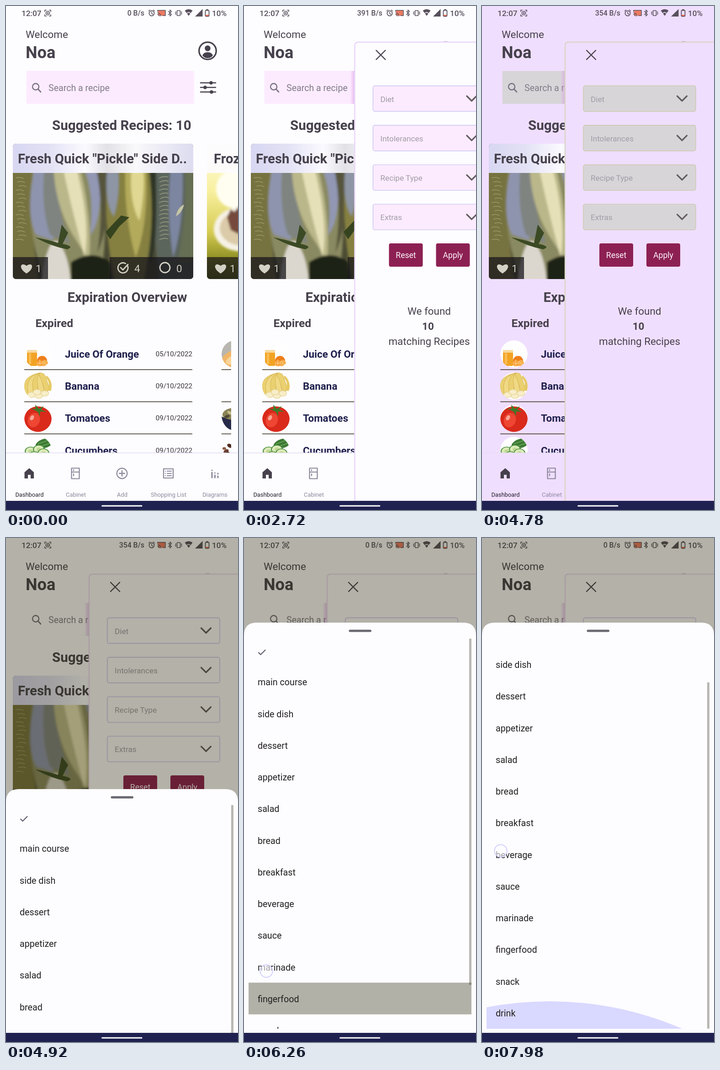
Recreate the animation shown at these times as an HTML page. Size 508 px wide and 1102 px high, loop 8000 ms.

```html
<!DOCTYPE html>
<html lang="en">
<head>
<meta charset="utf-8">
<title>Recipe app</title>
<style>
html, body { margin: 0; width: 100%; height: 100%; overflow: hidden; background: #fdfcff; }
svg { display: block; width: 100vw; height: 100vh; font-family: Roboto, sans-serif; --paper: #fdfcff; --fill: #fcebff; --edge: #c9c5f2; --rim: #ead6fb; }
.b { font-weight: 700; }
.m { font-weight: 500; }
.mid { text-anchor: middle; }
.end { text-anchor: end; }
.line { fill: none; stroke-linecap: round; stroke-linejoin: round; }
.field { fill: var(--fill); stroke: var(--edge); stroke-width: 1.4; }
.panel { fill: var(--paper); stroke: var(--rim); stroke-width: 2.4; }
</style>
</head>
<body>
<svg id="stage" viewBox="0 0 508 1102" preserveAspectRatio="none"></svg>
<script>
const LOOP = 8000;
const INK = '#46414c', NAVY = '#1f204c', GREY = '#8b889a';

const text = (x, y, size, str, fill = INK, cls = '') =>
  `<text x="${x}" y="${y}" font-size="${size}" fill="${fill}" class="${cls}">${str}</text>`;
const rect = (x, y, w, h, fill, r = 0, more = '') =>
  `<rect x="${x}" y="${y}" width="${w}" height="${h}" rx="${r}" fill="${fill}" ${more}/>`;
const disc = (x, y, r, fill, more = '') => `<circle cx="${x}" cy="${y}" r="${r}" fill="${fill}" ${more}/>`;
const oval = (x, y, rx, ry, fill, turn = 0) =>
  `<ellipse cx="${x}" cy="${y}" rx="${rx}" ry="${ry}" fill="${fill}" transform="rotate(${turn} ${x} ${y})"/>`;
const shape = (d, fill) => `<path d="${d}" fill="${fill}"/>`;
const line = (d, stroke = INK, w = 2) => `<path class="line" d="${d}" stroke="${stroke}" stroke-width="${w}"/>`;
const ring = (x, y, r, stroke, w) => disc(x, y, r, 'none', `stroke="${stroke}" stroke-width="${w}"`);
const clip = (id, box) => `<clipPath id="${id}">${box}</clipPath>`;

const defs = `<defs>
  ${clip('card', rect(15, 301, 395, 296, '#000', 7))}
  ${clip('card2', rect(440, 301, 395, 296, '#000', 7))}
  ${clip('pantry', rect(0, 720, 493, 257, '#000'))}
  ${clip('rows', rect(0, 220, 508, 853, '#000'))}
  ${clip('glowBox', rect(10, 900, 488, 173, '#000'))}
  ${clip('food', disc(0, 0, 30, '#000'))}
  <filter id="soft"><feGaussianBlur stdDeviation="2.5"/></filter>
  <linearGradient id="band"><stop offset="0" stop-color="#d8d7f2"/><stop offset=".2" stop-color="#e2e1f4"/>
    <stop offset=".4" stop-color="#fbfaff"/><stop offset=".52" stop-color="#e2e1e6"/>
    <stop offset=".68" stop-color="#f9f8fa"/><stop offset="1" stop-color="#dddcf0"/></linearGradient>
  <linearGradient id="sun" x2="0" y2="1"><stop offset="0" stop-color="#fffde0"/><stop offset=".35" stop-color="#f8f0a0"/>
    <stop offset=".65" stop-color="#d6cc52"/><stop offset=".85" stop-color="#8f9024"/><stop offset="1" stop-color="#5f6416"/></linearGradient>
  <linearGradient id="shade"><stop offset="0" stop-color="#d79ae2" stop-opacity="0"/>
    <stop offset="1" stop-color="#d79ae2" stop-opacity=".6"/></linearGradient>
</defs>`;

function statusBar() {
  const c = '#57505c';
  return text(34, 21.5, 17.2, '12:07', c, 'm')
    + line('M85 12v-3h3M95 9h3v3M98 19v3h-3M88 22h-3v-3', c, 1.7) + ring(91.5, 15.5, 4, c, 1.7) + disc(91.5, 15.5, 1.7, c)
    + `<text id="speed" x="303" y="21" font-size="15.8" fill="${c}" class="m end"></text>`
    + ring(319, 16, 5.6, c, 1.7) + line('M319 13v3.5l2.5 1.5M312.5 11l3-2.5M325.5 11l-3-2.5', c, 1.5)
    + rect(333, 10, 15, 11, '#ee7a62') + line('M332 12V9.5h17V21h-6M332 15a7 7 0 0 1 7 7M332 18.5a3.5 3.5 0 0 1 3.5 3.5', c, 1.6)
    + line('M355.5 11.5l7 7-3.5 3.5V8.5l3.5 3.5-7 7', c, 1.5)
    + rect(374.5, 10, 7, 11, 'none', 1, `stroke="${c}" stroke-width="1.7"`) + line('M371.5 12.5v6M384.5 12.5v6', c, 1.5)
    + shape('M391.5 10Q400 4 408.5 10L400 21.5Z', c) + line('M396 16q4-4 8 0', 'var(--paper)', 1.2)
    + shape('M414 23L430.5 6.5V23Z', c)
    + rect(436.5, 9.5, 8, 13, 'none', 1.5, `stroke="${c}" stroke-width="1.8"`) + rect(438.5, 7, 4, 2.5, c) + rect(437, 19.5, 7, 2.5, '#e2634c')
    + text(451, 21.5, 17.2, '10%', c, 'm');
}

function header() {
  return text(43, 70, 22.4, 'Welcome') + text(43, 114, 36.2, 'Noa', INK, 'b')
    + ring(441.5, 98, 18.8, INK, 3.3) + disc(441.5, 92.5, 6.3, INK)
    + shape('M430 108q3-7 11.5-7t11.5 7q-4 6-11.5 6t-11.5-6Z', INK)
    + rect(44.5, 142, 367, 72, 'var(--fill)', 2)
    + ring(65, 176.5, 7, '#77727f', 2.4) + line('M70.5 182l5.5 6', '#77727f', 2.6)
    + text(93, 186, 19.6, 'Search a recipe', '#817b88')
    + line('M426 168h33M426 178h33M426 188h33', INK, 2.6)
    + disc(449, 168, 3.8, INK) + disc(436, 178, 3.8, INK) + disc(450, 188, 3.8, INK)
    + text(101, 271, 29.5, 'Suggested Recipes: 10', INK, 'b');
}

const heart = x => shape(`M${x} 585C${x - 20} 572 ${x - 12} 559 ${x} 568C${x + 12} 559 ${x + 20} 572 ${x} 585Z`, '#d3d0c5');

function cucumbers() {
  let ribs = '';
  for (let i = 0; i < 16; i++) {
    const y = 376 + i * 9;
    ribs += line(`M${22 + i % 3 * 3} ${y}q8 -3 16 1`, '#b3b083', 1.6) + line(`M${336 + i % 3} ${y}q9 -5 18 -2`, '#a6ab8c', 2);
  }
  return rect(15, 301, 395, 296, '#4c4c34')
    + `<g filter="url(#soft)">`
    + shape('M5 340H62Q44 440 74 610H5Z', '#77733f')
    + shape('M62 340Q36 480 88 610H205Q226 500 212 340Z', '#8a8a62')
    + shape('M66 340Q40 450 66 500L104 512Q96 430 106 340Z', '#8f94ae')
    + shape('M84 350Q76 440 96 500L140 520Q108 430 112 340Z', '#7f8480')
    + shape('M104 340Q104 430 146 500L182 556Q190 460 158 340Z', '#bab78a')
    + shape('M122 340Q140 430 172 548Q186 470 150 340Z', '#e6e0b8')
    + shape('M164 340Q196 400 184 500Q212 470 206 350Z', '#9298b4')
    + shape('M196 350Q216 430 200 540Q232 470 222 350Z', '#57543a')
    + shape('M76 610Q90 508 112 514Q138 540 142 610Z', '#dcd7ce')
    + shape('M226 340Q208 470 240 610H300Q330 470 314 340Z', '#85803f')
    + shape('M262 340Q256 450 284 550Q314 470 306 340Z', '#b4aa5c')
    + shape('M274 360Q270 430 292 470Q308 390 298 345Z', '#e0d892')
    + shape('M222 350Q214 430 236 460Q252 410 244 345Z', '#8e95a4')
    + shape('M324 340Q320 480 336 610H415V340Z', '#5c655c')
    + shape('M362 340Q350 450 366 550Q392 470 386 340Z', '#7d86a0')
    + shape('M390 340Q400 440 376 560H415V340Z', '#666e52')
    + shape('M312 350Q326 450 312 560Q334 560 328 350Z', '#2f3527')
    + shape('M142 560Q190 530 228 560L232 610H142Z', '#1e2014')
    + `</g><g opacity=".6">${ribs}</g>`
    + shape('M64 506Q96 512 114 518L122 478L136 496L124 520Q152 526 134 532Q100 526 64 506Z', '#3b4a24')
    + shape('M218 494L252 458L270 462L248 482L228 510Z', '#36431f')
    + shape('M372 460Q376 440 390 434Q386 452 372 460Z', '#c7c6a4');
}

function cards() {
  return `<g clip-path="url(#card)">${cucumbers()}${rect(15, 301, 395, 64, 'url(#band)')}`
    + rect(15, 549, 77, 48, '#16151a', 0, 'opacity=".74"') + rect(227, 549, 183, 48, '#16151a', 0, 'opacity=".74"') + `</g>`
    + text(26, 344, 29.3, 'Fresh Quick "Pickle" Side D..', INK, 'b')
    + heart(45) + text(65, 582, 22.4, '1', '#d3d0c5')
    + line('M266.5 569a11 11 0 1 1-5-6M251 572l5 5 11-12', '#d3d0c5', 2.8) + text(281, 582, 22.4, '4', '#d3d0c5')
    + ring(348, 572, 11, '#d3d0c5', 2.8) + text(373, 582, 22.4, '0', '#d3d0c5')
    + `<g clip-path="url(#card2)">${rect(440, 301, 68, 296, 'url(#sun)')}<g filter="url(#soft)">`
    + oval(500, 400, 40, 42, '#fffef0') + oval(512, 488, 57, 48, '#f6f2e6') + oval(516, 486, 48, 38, '#dccba8')
    + shape('M484 462L492 444L500 450L512 436V500L492 490Z', '#74493a') + `</g>`
    + rect(440, 301, 68, 64, '#fdfcff', 0, 'opacity=".92"') + rect(440, 549, 68, 48, '#16151a', 0, 'opacity=".7"') + `</g>`
    + text(455, 344, 29.3, 'Froz', INK, 'b') + heart(470) + text(490, 582, 22.4, '1', '#d3d0c5');
}

const juice = rect(-24, -9, 22, 35, '#f2a324', 2) + rect(-24, -9, 22, 6, '#f8d9a0') + rect(-20, -2, 5, 24, '#f9bd55')
  + disc(9, 15, 11, '#ef7f1c') + disc(4, 20, 7, '#f9a23a') + disc(15, 20, 7, '#f6b04f') + line('M4 13v14M-2 20h12M10 16l10 8', '#fbd9a0', 1);
// a fan of bananas from one stem, with slices in front
const banana = [-26, -16, -5, 7, 19].map((x, i) => {
  const d = `M8 -24Q${x - 6} -18 ${x} ${14 - i * 2}`;
  return line(d, '#cfae4c', 12) + line(d, i % 2 ? '#f0d985' : '#ead070', 10.5);
}).join('') + line('M22 -20Q32 -8 26 6', '#e6c964', 9)
  + [[-14, 19], [2, 21], [15, 16], [-2, 13]].map(([x, y]) => oval(x, y, 9, 6.5, '#e3cf8c') + oval(x, y, 8, 5.5, '#f7edc8')).join('');
const tomato = oval(0, 2, 30, 28, '#d92a1c') + oval(-9, 4, 13, 16, '#ee4632', 20) + oval(-13, -1, 4, 6, '#f9a596', 30)
  + shape('M0 -14L-17 -22L-5 -20L-6 -30L2 -21L13 -27L7 -19L19 -14L5 -15L4 -4Z', '#3f7a2a');
const cuke = oval(14, -15, 20, 10, '#3c7a35', -18) + line('M0 -14L28 -24M4 -8L30 -17', '#78b062', 1.5)
  + [[-16, 2], [2, -2], [-8, 12], [12, 6]].map(([x, y]) => oval(x, y, 13, 10, '#4a8c3f') + oval(x, y, 11, 8.5, '#dcebb9') + oval(x, y, 5, 4, '#c0d894')).join('');
const melon = disc(0, 0, 30, '#b9b6b0') + oval(0, 8, 34, 18, '#f0b568', -25) + oval(-4, 12, 18, 9, '#f8d59b', -25);
const seeds = oval(0, -8, 28, 15, '#8b8357') + oval(-12, -12, 6, 3, '#c7bf8e', 30) + oval(-18, -4, 6, 3, '#4e4a32', -20) + shape('M-30 -4Q0 12 30 -4Q24 26 0 28Q-26 24 -30 -4Z', '#272a48');
const cloves = oval(-12, -10, 6, 4, '#4f2d24', 30) + oval(-20, 2, 6, 4, '#6d4030', -30) + oval(-14, 9, 7, 4, '#3d241e', 60) + oval(-24, -4, 4, 3, '#8a5a44');

const food = (x, y, art) => `<g transform="translate(${x} ${y})" clip-path="url(#food)">${disc(0, 0, 30, '#fefeff')}${art}</g>`;

function pantry() {
  const items = [['Juice Of Orange', '05', juice, melon], ['Banana', '09', banana, ''],
    ['Tomatoes', '09', tomato, seeds], ['Cucumbers', '09', cuke, cloves]];
  const rows = items.map(([name, day, art, next], i) => {
    const y = 761 + i * 70.2;
    return food(70, y, art) + (next && food(502, y, next))
      + text(129, y + 8, 22.4, name, NAVY, 'b') + text(408, y + 5, 15.1, day + '/10/2022', '#38343a', 'end')
      + rect(40, y + 33.3, 368, 1.7, '#4b4436') + rect(472, y + 33.3, 22, 1.7, '#4b4436');
  }).join('');
  return text(134.5, 647, 29.4, 'Expiration Overview', INK, 'b') + text(64.5, 702, 24.6, 'Expired', INK, 'b')
    + `<g clip-path="url(#pantry)">${rows}</g>`;
}

function tabs() {
  const labels = ['Dashboard', 'Cabinet', 'Add', 'Shopping List', 'Diagrams'];
  return rect(0, 976.5, 508, 1.5, '#e3e0f3')
    + shape('M40.5 1019.5L51 1010.5L61 1019.5V1033H54V1025H48V1033H40.5Z', INK)
    + line('M143.5 1010.5h17v23h-17zM143.5 1019h17M148 1014v2M148 1023v4', GREY, 2.2)
    + ring(254, 1022, 11.3, GREY, 2.2) + line('M254 1016v12M248 1022h12', GREY, 2.3)
    + line('M345 1012h21v20h-21zM349 1017h.1M353 1017h9M349 1022h.1M353 1022h9M349 1027h.1M353 1027h9', GREY, 2.2)
    + line('M451 1015v.1M451 1020v11M457.5 1021v.1M457.5 1026v5M464 1022v1M464 1028v3', GREY, 3)
    + labels.map((s, i) => text(51.5 + i * 101.5, 1072.5, 12.85, s, i ? GREY : '#201d26', 'mid')).join('');
}

function drawer() {
  const fields = ['Diet', 'Intolerances', 'Recipe Type', 'Extras'].map((s, i) => {
    const y = 174.5 + i * 86.3;
    return `<rect class="field" x="40" y="${y}" width="246" height="56" rx="4"/>`
      + text(56, y + 35, 17.2, s, '#a29ca6') + line(`M245.5 ${y + 22.5}l10.5 10.5l10.5 -10.5`, '#625d60', 3.3);
  }).join('');
  const button = (x, s) => rect(x, 519, 74, 51, '#8d2053', 4) + text(x + 37, 551, 17.6, s, '#fdf6fb', 'mid');
  return `<g id="drawer">${rect(-10, 142, 10, 72, 'url(#shade)', 0, 'id="edge"')}`
    + `<path class="panel" d="M0 1083V87Q0 79 8 79H420V1083Z"/>`
    + line('M47 97l20 20M67 97l-20 20', INK, 2.4) + fields + button(75, 'Reset') + button(178, 'Apply')
    + text(163, 675, 22.4, 'We found', INK, 'mid') + text(160.5, 708, 22.4, '10', INK, 'b mid')
    + text(163, 741, 22.4, 'matching Recipes', INK, 'mid') + `</g>`;
}

function sheet() {
  const names = ['', 'main course', 'side dish', 'dessert', 'appetizer', 'salad', 'bread', 'breakfast',
    'beverage', 'sauce', 'marinade', 'fingerfood', 'snack', 'drink'];
  const rowY = i => 246 + i * 69.25;
  return `<g id="sheet">${shape('M0 1102V213Q0 185 28 185H480Q508 185 508 213V1102Z', '#fdfcff')}`
    + rect(229.5, 200.5, 49.5, 5, '#6a6870', 2.5)
    + `<g clip-path="url(#rows)"><g id="list">`
    + rect(10, rowY(11) - 35.5, 488, 69.3, '#b2b1a8', 0, 'id="pressed"')
    + line('M32 250.5l4.5 4.5l10 -10', '#5d586a', 2.1)
    + `</g></g><g clip-path="url(#glowBox)">${disc(148, 1900, 732, '#d9d8ff', 'id="glow"')}</g>`
    + `<g clip-path="url(#rows)"><g id="labels">${names.map((s, i) => text(30, rowY(i) + 7, 19.7, s, '#22201f')).join('')}</g></g>`
    + rect(493, 220, 5, 757, '#1a1800', 0, 'id="bar" opacity=".3"') + `</g>`;
}

const stage = document.getElementById('stage');
stage.innerHTML = defs + rect(0, 0, 508, 1102, 'var(--paper)') + statusBar() + header() + cards() + pantry() + tabs() + drawer()
  + rect(0, 0, 508, 1082, '#242100', 0, 'id="dim" opacity=".34"') + sheet()
  + disc(0, 0, 13.7, '#fdfcff', 'id="finger" fill-opacity=".6" stroke="#cdccff" stroke-width="1.8"')
  + rect(0, 1082, 508, 20, '#1f2150') + rect(209, 1091.5, 89.5, 3, '#fdfcff', 1.5);

const el = Object.fromEntries([...stage.querySelectorAll('[id]')].map(n => [n.id, n]));
const clamp = v => Math.min(1, Math.max(0, v));
const span = (t, a, b) => clamp((t - a) / (b - a));
const mix = (a, b, p) => a + (b - a) * p;
const move = (node, x, y) => node.setAttribute('transform', `translate(${x} ${y})`);
const show = (node, on) => node.setAttribute('visibility', on ? 'visible' : 'hidden');

// [start ms, value]; the last one reached holds
const at = (steps, t) => steps.reduce((v, [ms, next]) => t >= ms ? next : v, steps[0][1]);
const SPEED = [[0, '0 B/s'], [1700, '391 B/s'], [3000, '354 B/s'], [5740, '0 B/s']];
const LOOK = [
  [0, { paper: '#fdfcff', fill: '#fcebff', edge: '#c9c5f2', rim: '#ead6fb' }],
  [4740, { paper: '#f0deff', fill: '#d8d5d9', edge: '#c9c8aa', rim: '#d9d6c8' }],
  [4900, { paper: '#fdfcff', fill: '#fdfcff', edge: '#cbbdf0', rim: '#efdcf4' }]
];

function draw(t) {
  el.speed.textContent = at(SPEED, t);
  for (const [k, v] of Object.entries(at(LOOK, t))) stage.style.setProperty('--' + k, v);
  show(el.dim, t >= 4900);

  const x = 182 + 326 * (1 - span(t, 2380, 2900)) ** 1.58;
  move(el.drawer, x, 0);
  show(el.drawer, t >= 2380);
  el.edge.setAttribute('opacity', x < 411 ? 1 : 0);

  // the sheet stalls briefly on its way up
  const rise = t >= 5080 && t < 5180 ? 5080 : t;
  move(el.sheet, 0, 917 * (1 - span(rise, 4790, 5500)) ** 4.53);
  show(el.sheet, t >= 4790);

  const fx = t < 6260 ? mix(51, 49, span(t, 6060, 6260)) : mix(49, 41, span(t, 6260, 7980));
  const fy = t < 6260 ? mix(1003, 947, span(t, 6060, 6260)) : mix(947, 684, span(t, 6260, 7980));
  move(el.finger, fx, fy);
  show(el.finger, t >= 6060);
  el.pressed.setAttribute('opacity', t >= 6120 && t < 6320 ? 1 : 0);

  const scroll = 107.5 * clamp((942 - fy) / 107.5);
  move(el.list, 0, -scroll);
  move(el.labels, 0, -scroll);
  move(el.bar, 0, scroll * .89);
  el.glow.setAttribute('cy', 1805 - Math.max(0, 834 - fy) * .4);
}

function tick() {
  draw(performance.now() % LOOP);
  requestAnimationFrame(tick);
}
tick();
</script>
</body>
</html>
```
